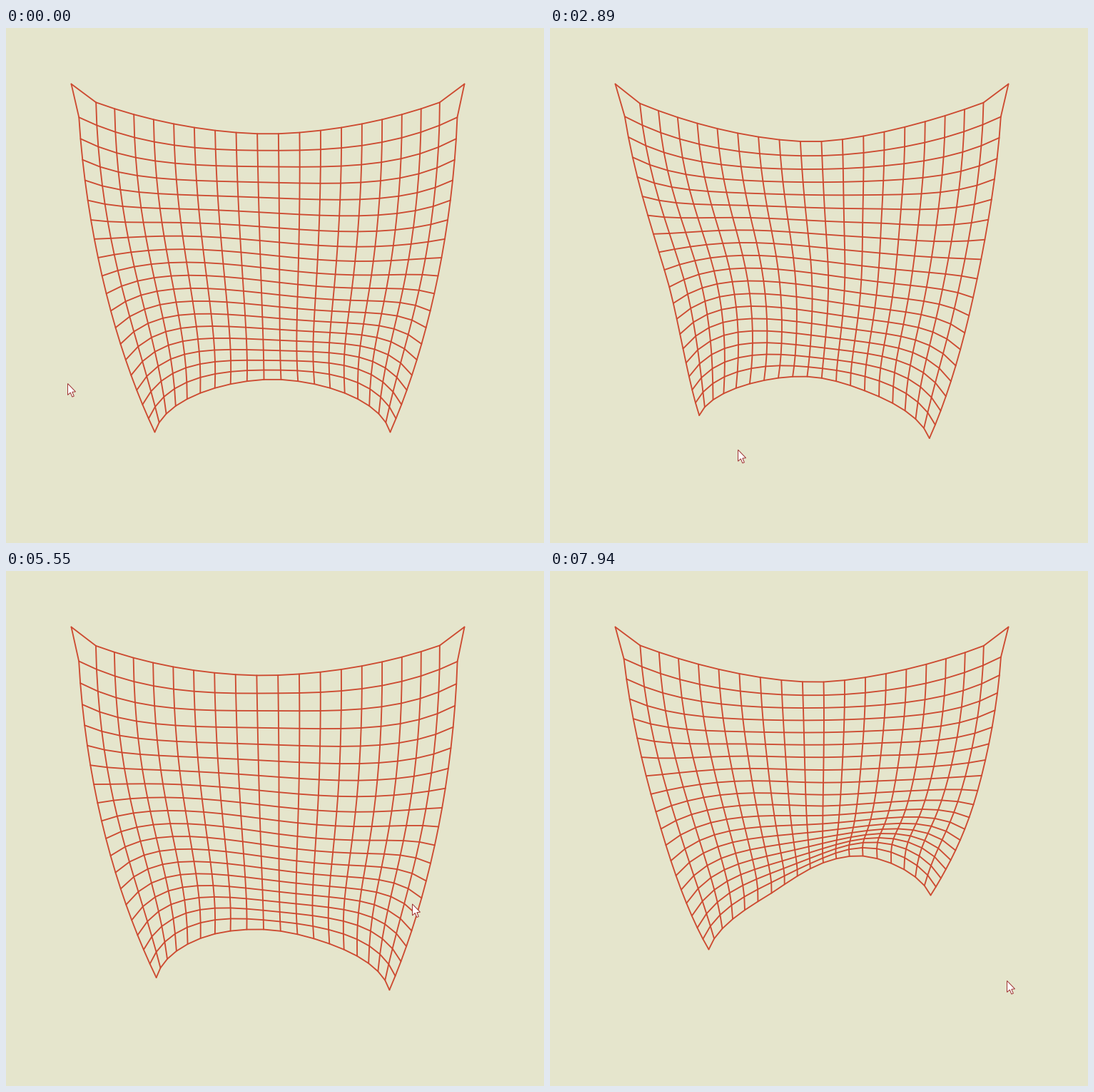
A matplotlib script for the animation above (7.99 s loop, 754x722 px).

```python
import numpy as np
import matplotlib.pyplot as plt
from matplotlib.animation import FuncAnimation
from matplotlib.collections import LineCollection
from matplotlib.patches import Polygon

W, H, DPI = 754, 722, 100
FRAMES, STEP = 170, 47
N = 20                                    # threads in each direction
PAPER, THREAD = "#e5e5cc", "#cd4a30"
PINS = (91, 78), (642, 78)


def hanging():
    """The cloth at rest: wide and sagging on top, narrow and arched below."""
    v, s = np.meshgrid(np.linspace(0, 1, N), np.linspace(-1, 1, N), indexing="ij")
    half = 266 - 101 * v ** 1.6
    crowd = 0.06 + 0.32 * v ** 6          # threads gather at the lower sides
    x = 366.5 + 6.5 * v + half * s * (1 + crowd * (1 - s * s))
    side = 94 + 472 * v * (1.25 - 0.25 * v)
    middle = 148 + 344 * v * (1.3 - 0.3 * v)
    y = middle + (side - middle) * np.abs(s) ** (1.8 + 14 * v * (1 - v))
    y += 9 * np.sin(np.pi * s) * np.sin(np.pi * v) ** 2
    return np.stack([x, y], axis=-1)


def thin_plate(handles, points):
    """Weights that spread the shifts of the handles smoothly over the points."""
    def kernel(a):
        d2 = ((a[:, None] - handles[None]) ** 2).sum(-1)
        return d2 * np.log(np.maximum(d2, 1e-9))

    def affine(a):
        return np.column_stack([np.ones(len(a)), a])

    n = len(handles)
    base = affine(handles)
    system = np.block([[kernel(handles), base], [base.T, np.zeros((3, 3))]])
    return np.hstack([kernel(points), affine(points)]) @ np.linalg.inv(system)[:, :n]


def curve(times, values, t):
    """Smooth motion through values at uneven times."""
    times, values = np.asarray(times, float), np.asarray(values, float)
    t = min(max(t, times[0]), times[-1])
    slope = np.gradient(values, times, axis=0, edge_order=2)
    i = min(np.searchsorted(times, t, side="right") - 1, len(times) - 2)
    h = times[i + 1] - times[i]
    u = (t - times[i]) / h
    return ((1 + 2 * u) * (1 - u) ** 2 * values[i]
            + u * (1 - u) ** 2 * h * slope[i]
            + u * u * (3 - 2 * u) * values[i + 1]
            + u * u * (u - 1) * h * slope[i + 1])


# handles on the cloth (row, column); the last two stay at the pins
HANDLES = np.array([(0, 10), (6, 6), (6, 13), (10, 0), (10, 10), (10, 19),
                    (19, 0), (19, 6), (19, 13), (19, 19), (0, 0), (0, 19)])
REST = hanging()
GRID = np.indices((N, N)).reshape(2, -1).T
SPREAD = thin_plate(HANDLES / N, GRID / N)
HOME = REST[HANDLES[:, 0], HANDLES[:, 1]]


def pull(*places):
    return np.vstack([places, HOME[-2:]]) - HOME


calm = np.zeros_like(HOME)
low = 0.026 * (HOME - PINS[0]) * (0, 1)   # hanging at full stretch
lifted = pull((379, 176), (290, 236), (459, 225), (211, 301), (389, 266),
              (539, 362), (276, 400), (359, 331), (417, 425), (460, 511))
slanted = pull((380, 150), (280, 257), (463, 262), (167, 308), (386, 331),
               (572, 369), (235, 419), (331, 375), (438, 455), (486, 541))
crumpled = pull((377, 178), (300, 240), (460, 239), (222, 332), (404, 311),
                (579, 374), (208, 478), (312, 458), (413, 497), (521, 569))
folded = pull((380, 148), (283, 247), (464, 257), (196, 272), (387, 315),
              (566, 374), (263, 331), (357, 318), (434, 436), (462, 531))
swept = pull((388, 190), (297, 222), (458, 232), (188, 344), (394, 271),
             (565, 325), (233, 471), (347, 426), (451, 370), (484, 445))
settling = pull((383, 155), (277, 259), (463, 258), (155, 361), (382, 329),
                (593, 327), (222, 530), (310, 451), (438, 399), (533, 454))

PULL_AT = [0, 19, 43, 62, 76, 96, 121, 137, 168]
PULLS = [calm, lifted, slanted, 0.65 * low + 0.35 * crumpled, crumpled,
         folded, low, swept, settling]

# pointer path: frame, x, y
PATH = np.array([
    (0, 86, 498), (8, 330, 440), (17, 74, 375), (19, 65, 373), (43, 15, 298),
    (46, 3, 330), (52, 200, 655), (66, 300, 520), (76, 553, 661),
    (96, 704, 337), (101, 712, 345), (113, 470, 450), (122, 655, 470),
    (137, 527, 422), (150, 490, 26), (168, 640, 574)], float)

ARROW = np.array([(0, 0), (0, 16), (3.8, 12.6), (6.3, 18.6), (8.8, 17.6),
                  (6.3, 11.8), (11, 11.4)])

fig = plt.figure(figsize=(W / DPI, H / DPI), dpi=DPI, facecolor=PAPER)
ax = fig.add_axes((0, 0, 1, 1))
ax.set_xlim(-0.5, W - 0.5)
ax.set_ylim(H - 0.5, -0.5)
ax.axis("off")

net = LineCollection([], colors=THREAD, linewidths=1.85 * 72 / DPI,
                     capstyle="round", joinstyle="round")
ax.add_collection(net)
pointer = Polygon(ARROW, closed=True, facecolor="white", edgecolor="#a03434",
                  linewidth=72 / DPI, joinstyle="miter", zorder=5)
ax.add_patch(pointer)


def draw(k):
    shift = SPREAD @ curve(PULL_AT, PULLS, k)
    pts = REST + shift.reshape(N, N, 2)
    pts[0, 0], pts[0, -1] = PINS
    net.set_segments(list(pts) + list(pts.swapaxes(0, 1)))
    pointer.set_xy(ARROW + curve(PATH[:, 0], PATH[:, 1:], k))
    return net, pointer


anim = FuncAnimation(fig, draw, frames=FRAMES, interval=STEP,
                     init_func=lambda: draw(0), repeat=True, repeat_delay=0)
plt.show()
```
